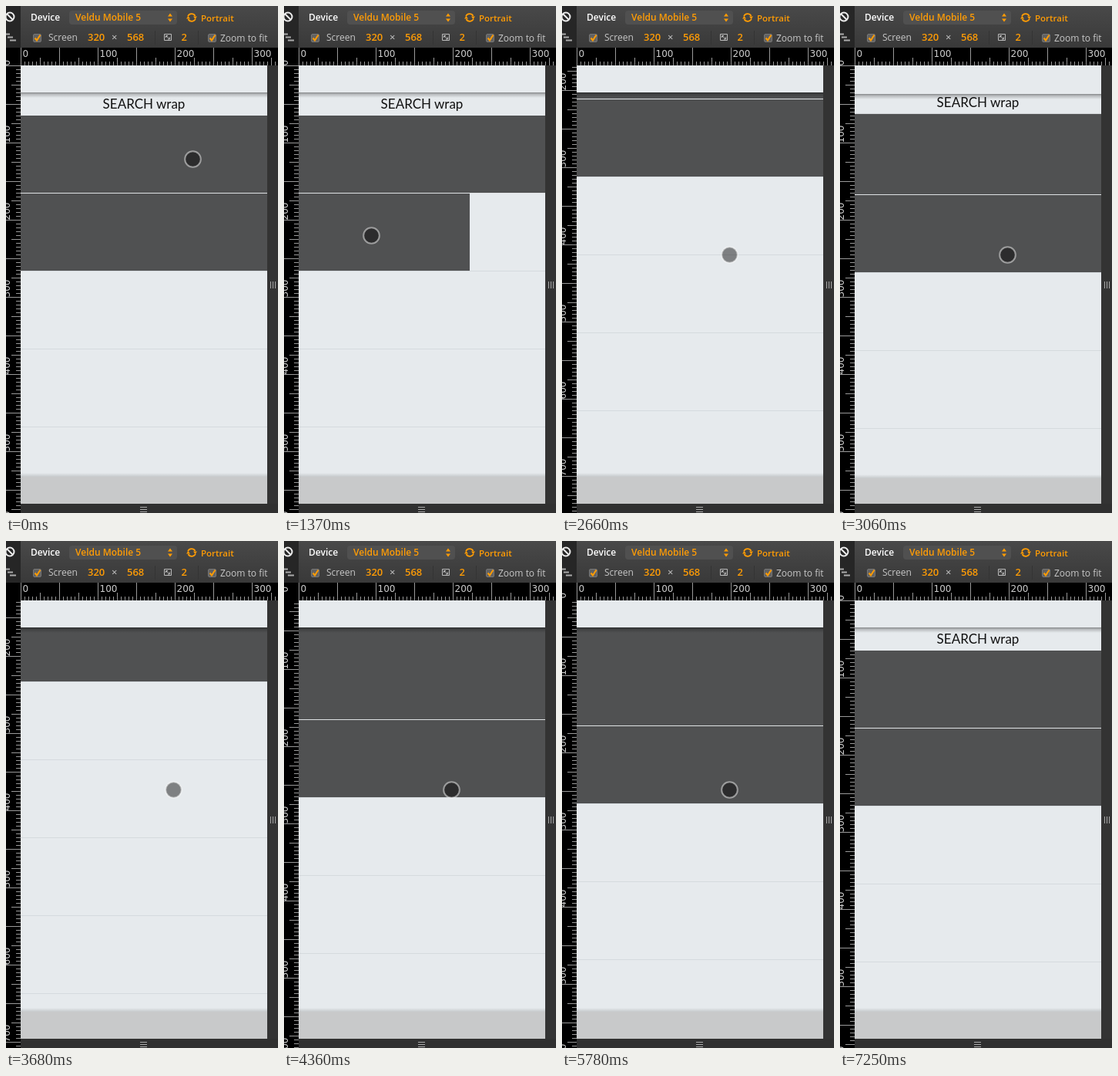
Write an HTML page that moves like this. It is 353 px wide and 657 px high and loops after 8.18 s.

```html
<!DOCTYPE html>
<html lang="en">
<head>
<meta charset="utf-8">
<title>Swipe list in device mode</title>
<style>
html, body { margin: 0; width: 100%; height: 100%; overflow: hidden; background: #333; }
svg { display: block; width: 353px; height: 657px; }
.ui { font: 12px "Open Sans", "Noto Sans", sans-serif; fill: #c8c8c8; }
.ui .on { fill: #ff9c05; }
.ui .num { font-size: 13px; }
.ui .strong { font-weight: 600; }
.rule { font: 12px "DejaVu Sans", sans-serif; fill: #ccc; }
.search { font: 17px Lato, sans-serif; fill: #111; }
</style>
</head>
<body>
<svg viewBox="0 0 353 657">
  <defs>
    <linearGradient id="bar" x2="0" y2="1">
      <stop offset="0" stop-color="#494949"/><stop offset="1" stop-color="#393939"/>
    </linearGradient>
    <linearGradient id="shade" x2="0" y2="1">
      <stop offset="0" stop-opacity=".42"/><stop offset=".35" stop-opacity=".2"/><stop offset="1" stop-opacity="0"/>
    </linearGradient>
    <linearGradient id="lift" x2="0" y2="1">
      <stop offset="0" stop-opacity="0"/><stop offset="1" stop-opacity=".14"/>
    </linearGradient>
    <clipPath id="screen"><path d="M19 77h320v568H19z"/></clipPath>
    <clipPath id="side"><path d="M0 55h19v602H0z"/></clipPath>
    <g id="check">
      <rect width="10" height="10" rx="1.5" fill="#626262" stroke="#777"/>
      <path d="M2 5l2.5 3L9 1" fill="none" stroke="#ff9c05" stroke-width="2"/>
    </g>
  </defs>

  <rect width="353" height="657" fill="#333"/>
  <rect x="19" width="334" height="54" fill="url(#bar)"/>
  <rect width="19" height="54" fill="#262626"/>
  <rect y="54" width="353" height="23"/>
  <rect y="77" width="19" height="580"/>

  <g fill="none" stroke="#eee" stroke-width="2">
    <circle cx="5" cy="14" r="5.5"/><path d="M1 10l8 8"/>
  </g>
  <path d="M0 36.5h5M2 40.5h7M5 44.5h8" stroke="#aaa" stroke-width="2"/>

  <g class="ui">
    <rect x="82" y="6" width="140" height="18" rx="4" fill="#505050"/>
    <text class="strong" x="32" y="19" style="fill:#fff">Device</text>
    <text class="on strong" x="90" y="19">Veldu Mobile 5</text>
    <path class="on" d="M210 13.5l3-4 3 4zM210 16.5l3 4 3-4z"/>
    <path d="M236 13.5a5.2 5.2 0 0 1 9.5-.5M246 16.5a5.2 5.2 0 0 1-9.500 .5" fill="none" stroke="#ff9c05" stroke-width="1.7"/>
    <path class="on" d="M243 13.5h5l-2.5 3.5zM234 16.5h5l-2.5-3.5z"/>
    <text class="on strong" x="253" y="20" style="font-size:11.5px">Portrait</text>
    <use href="#check" x="35.5" y="36.5"/>
    <text x="55" y="45">Screen</text>
    <text class="on num strong" x="106" y="45">320</text>
    <text class="num" x="137" y="45">×</text>
    <text class="on num strong" x="157" y="45">568</text>
    <path d="M193.5 32v18M249.5 32v18" stroke="#343434"/>
    <path d="M205.5 36.5h9v8h-9zM208 39l4 3.5M207.5 41v-2.5h2.5M212.5 40.5v2.5H210" fill="none" stroke="#bbb"/>
    <text class="on num strong" x="227.5" y="45">2</text>
    <use href="#check" x="262.5" y="36.5"/>
    <text x="278" y="45.5">Zoom to fit</text>
  </g>

  <g class="rule" id="top"></g>
  <g clip-path="url(#side)"><g class="rule" id="left"></g></g>

  <g clip-path="url(#screen)">
    <rect x="19" y="77" width="320" height="568" fill="#e6eaed"/>
    <g id="page">
      <g id="list">
        <g id="lines"></g>
        <rect id="row1" x="19" y="112" width="320" height="130" fill="#505152"/>
        <rect id="row2" x="19" y="243" width="320" height="100" fill="#505152"/>
        <rect x="19" y="242" width="320" height="1" fill="#dfe2e4"/>
      </g>
      <g id="search">
        <rect x="19" y="112" width="320" height="30" fill="#e6eaed"/>
        <text class="search" x="179" y="133" text-anchor="middle">SEARCH wrap</text>
      </g>
      <rect x="19" y="60" width="320" height="52" fill="#e6eaed"/>
      <rect x="19" y="112" width="320" height="7" fill="url(#shade)"/>
      <rect x="19" y="605" width="320" height="5" fill="url(#lift)"/>
      <rect x="19" y="610" width="320" height="50" fill="#c8c9ca"/>
    </g>
  </g>

  <rect x="19" y="645" width="334" height="12" fill="#303030"/>
  <path d="M174 649.5h9M174 652.5h9M174 655.5h9M343.5 357v9M346.5 357v9M349.5 357v9" stroke="#aaa"/>
  <circle id="touch" r="10.3" fill="#000" fill-opacity=".45" stroke="#fff" stroke-opacity=".48" stroke-width="2"/>
</svg>
<script>
const LOOP = 8180, STEP = 60, RISE = 540;
const $ = id => document.getElementById(id);
const shift = (id, x, y) => $(id).setAttribute('transform', `translate(${x} ${y})`);

// Smooth 0 to 1 between two times.
function ramp(t, from, to) {
  const p = Math.min(1, Math.max(0, (t - from) / (to - from)));
  return p * p * (3 - 2 * p);
}

// Each fling runs out to its peak, back to a short rest, then home.
const flings = [
  { start: 1850, peak: 237, back: 2840, rest: 0, home: 2800, bounce: 13 },
  { start: 3260, peak: 210, back: 4290, rest: 11, home: 4360, bounce: 0 },
  { start: 4920, peak: 165, back: 5670, rest: 3, home: 5780, bounce: 0 }
];
const sum = f => flings.reduce((total, fling) => total + f(fling), 0);

const scrollAt = t => Math.round(sum(f => {
  const p = (t - f.back) / 200;
  return f.peak * ramp(t, f.start, f.start + RISE)
    - (f.peak - f.rest) * ramp(t, f.start + RISE, f.back)
    - f.rest * ramp(t, f.home, f.home + 120)
    - (p > 0 && p < 1 ? f.bounce * Math.sin(Math.PI * p) : 0);
}));

const hiddenAt = t => 30 * sum(f =>
  ramp(t, f.start + 160, f.start + 328) - ramp(t, f.home, f.home + 300));

function ticks(max, size, mark) {
  for (let v = 0; v <= max; v += 5)
    mark(v, v % 50 === 0 ? 23 : v % 25 === 0 ? 2 * size : size);
}

function drawTop() {
  let d = '', labels = '';
  ticks(330, 5, (v, len) => {
    d += `M${19.5 + v} 77v${-len}`;
    if (v % 100 === 0) labels += `<text x="${21.5 + v}" y="66">${v}</text>`;
  });
  $('top').innerHTML = `<path d="${d}" stroke="#999"/>${labels}`;
}

function drawLeft(offset) {
  let d = '', labels = '';
  ticks(900, 6, (v, len) => {
    const y = 77.5 + v - offset;
    if (y >= 77) d += `M19 ${y}h${-len}`;
    if (v % 100 === 0) labels += `<text transform="translate(5 ${y}) rotate(-90)">${v}</text>`;
  });
  $('left').innerHTML = `<path d="${d}" stroke="#999"/>${labels}`;
}

function drawLines() {
  for (let y = 343; y < 1000; y += 101)
    $('lines').innerHTML += `<rect x="19" y="${y}" width="320" height="1" fill="#d5dade"/>`;
}

function draw(time) {
  const t = Math.floor((time - 30) / STEP) * STEP + 30;
  const scroll = scrollAt(t);
  shift('page', 0, Math.max(0, -scroll));
  shift('list', 0, -Math.max(0, scroll));
  shift('search', 0, -hiddenAt(t));
  drawLeft(Math.max(0, scrollAt(t - STEP)));

  const drag1 = ramp(t, 180, 500), drag2 = ramp(t, 1040, 1340);
  const toRow2 = ramp(t, 600, 920), away = ramp(t, 1440, 1740), leave = ramp(t, 6840, 6930);
  shift('row1', -220 * (drag1 - ramp(t, 980, 1240)), 0);
  shift('row2', -98 * (drag2 - away), 0);
  shift('touch',
    242.5 - 220 * drag1 + 189 * toRow2 - 98 * drag2 + 104 * away + 60 * leave,
    198.5 + 85 * toRow2 + 14 * drag2 + 25 * away - 138 * leave);
  $('touch').style.display = time < 7020 ? '' : 'none';
}

drawTop();
drawLines();
const begin = performance.now();
function frame() {
  draw((performance.now() - begin) % LOOP);
  requestAnimationFrame(frame);
}
frame();
</script>
</body>
</html>
```
